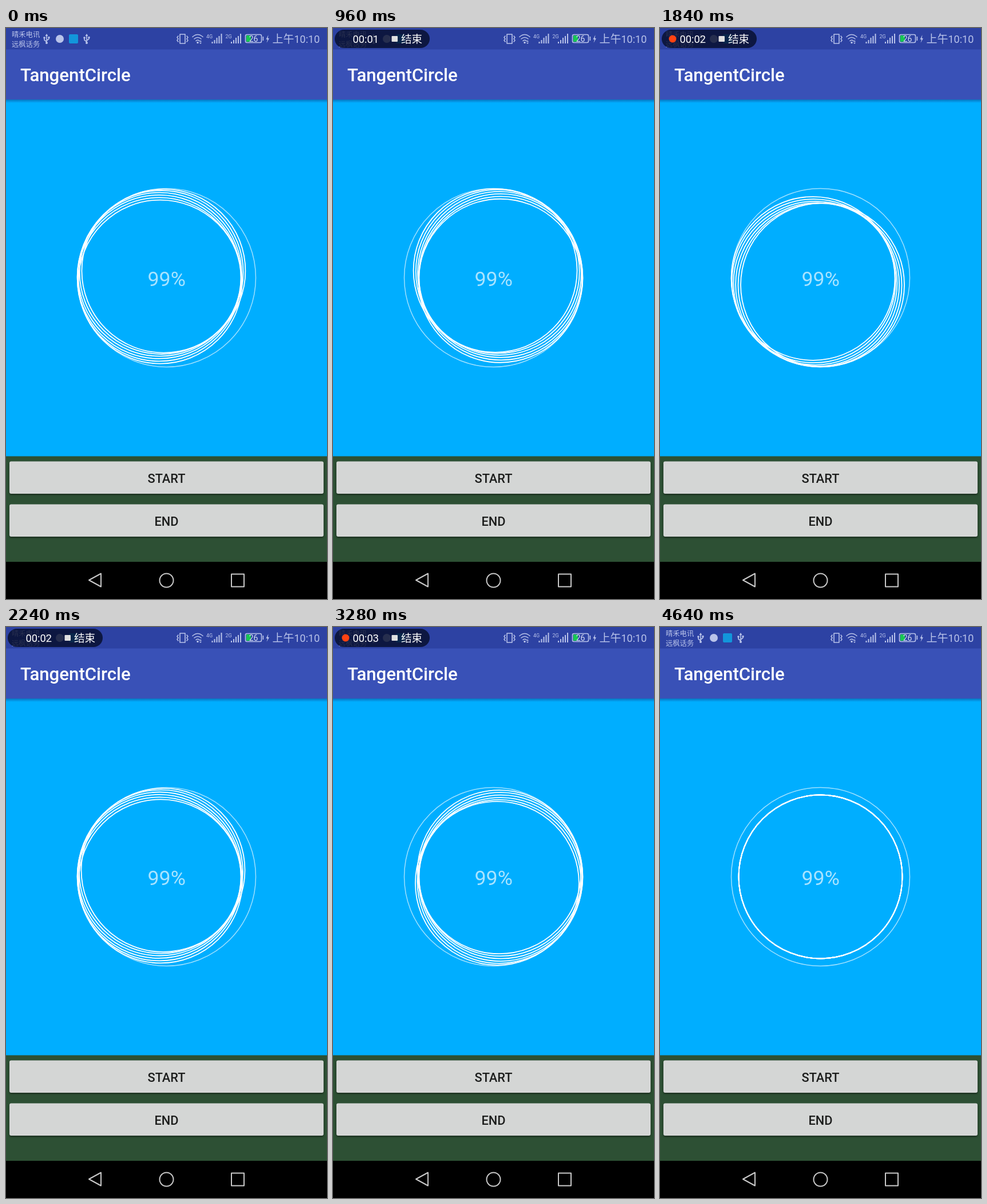
These frames come from a looping animation (561 px wide and 998 px high, 4.8 s). An HTML page:

```html
<!DOCTYPE html>
<html lang="zh">
<head>
<meta charset="utf-8">
<title>TangentCircle</title>
<style>
  html, body { margin: 0; width: 100%; height: 100%; overflow: hidden; background: #000; }
  svg { display: block; width: 100%; height: 100%; }
  text { font-family: Roboto, "Noto Sans CJK SC", "Noto Sans CJK", sans-serif; }
  .cjk { font-family: "Noto Sans CJK SC", "Noto Sans CJK", sans-serif; }
  .line { fill: none; stroke: #b9c3ea; stroke-width: 1.6; stroke-linecap: round; stroke-linejoin: round; }
  .btn text { font-weight: 500; font-size: 21.8px; fill: #1c1d1c; text-anchor: middle; }
  .nav { fill: none; stroke: #c9c9c9; stroke-width: 2; stroke-linejoin: round; }
</style>
</head>
<body>
<svg viewBox="0 0 561 998">
  <defs>
    <linearGradient id="shade" x2="0" y2="1">
      <stop stop-color="#123a80" stop-opacity=".5"/>
      <stop offset="1" stop-color="#123a80" stop-opacity="0"/>
    </linearGradient>
    <filter id="blur" x="-5%" y="-30%" width="110%" height="160%"><feGaussianBlur stdDeviation="1.6"/></filter>
    <g id="usb">
      <path class="line" d="M0-6V7M-4-1V2L0 5M4-2V0L0 3"/>
      <path d="M-2.5-5L0-9L2.5-5ZM2.5-4h3v3h-3Z"/>
      <circle cx="-4" cy="-2" r="1.8"/><circle cy="7" r="2"/>
    </g>
    <path id="bars" d="M0 14h2v3h-2zM4 11h2v6h-2zM8 7h2v10h-2zM12 4h2v13h-2zM16 0h2v17h-2z"/>
  </defs>

  <rect width="561" height="749" fill="#00aeff"/>
  <rect y="125" width="561" height="6" fill="url(#shade)"/>
  <rect width="561" height="125" fill="#3951b7"/>
  <rect width="561" height="37.5" fill="#2d42a3"/>
  <text x="25" y="93" font-size="31.2" font-weight="500" fill="#fff">TangentCircle</text>

  <!-- status bar -->
  <g fill="#b9c3ea">
    <g class="cjk" font-size="12.3">
      <text class="cjk" x="10" y="15.5">晴禾电讯</text>
      <text class="cjk" x="10" y="32.5">远枫话务</text>
    </g>
    <use href="#usb" x="71" y="19"/>
    <circle cx="94" cy="19" r="7"/>
    <rect x="110" y="11" width="16" height="16" rx="2" fill="#1296db"/>
    <use href="#usb" x="141" y="19"/>
    <path class="line" d="M304 11h9v16h-9zM301 14l-2 2.5 2 2.5-2 2.5 2 2.5M316 14l2 2.5-2 2.5 2 2.5-2 2.5"/>
    <path class="line" stroke-width="2" d="M326 15.5q9-8 18 0M329 19q6-5 12 0M332 22.5q3-2.5 6 0"/>
    <circle cx="335" cy="25.5" r="1.7"/>
    <path d="M338 24l2-2.5 2 2.5zM338 25.5h4l-2 2.5z"/>
    <text x="350" y="18" font-size="9">4G</text>
    <use href="#bars" x="359.500" y="10"/>
    <text x="383.500" y="18" font-size="9">2G</text>
    <use href="#bars" x="393" y="10"/>
    <rect class="line" x="418.500" y="11.500" width="28" height="14" rx="2.500"/>
    <rect x="420" y="13" width="8" height="11" fill="#17c653"/>
    <text x="432.500" y="23.800" font-size="14" fill="#d8def5" text-anchor="middle">26</text>
    <path d="M448.500 15h1.700v7h-1.700zM458.500 12l-4 8h2.500l-1.500 6 4.500-8h-2.500z"/>
    <text class="cjk" x="465.500" y="26" font-size="19">上午</text>
    <text x="503.500" y="26" font-size="18">10:10</text>
  </g>

  <!-- recorder badge -->
  <g id="badge" fill="#fff">
    <rect x="3" y="3" width="166" height="32" rx="16" fill="#070e2c" fill-opacity=".82"/>
    <circle id="dot" cx="22" cy="19" r="6.500" fill="#ff4312"/>
    <text id="clock" x="34.500" y="26" font-size="18.300">00:00</text>
    <rect x="102.500" y="14" width="10.500" height="10" rx="1" fill="#e0e0e0"/>
    <text class="cjk" x="119" y="26" font-size="18.500">结束</text>
  </g>

  <g fill="none" stroke="#fff">
    <circle cx="280.500" cy="436.500" r="156" stroke-width="1.500" opacity=".62"/>
    <g id="rings" stroke-width="1.800"></g>
  </g>
  <text x="280.700" y="451" font-size="35.800" fill="#fff" fill-opacity=".66" text-anchor="middle">99%</text>

  <rect y="748.500" width="561" height="185" fill="#2d5034"/>
  <g class="btn">
    <rect x="6" y="760" width="549" height="56" rx="3" fill="#000" opacity=".45" filter="url(#blur)"/>
    <rect x="6" y="757.500" width="549" height="56.500" rx="3" fill="#d4d6d5"/>
    <text x="280.500" y="794.500">START</text>
    <rect id="endShade" x="6" y="835" width="549" height="56" rx="3" fill="#000" opacity=".45" filter="url(#blur)"/>
    <rect id="endFace" x="6" y="832.500" width="549" height="56.500" rx="3" fill="#d4d6d5"/>
    <text x="280.500" y="869.500">END</text>
  </g>

  <rect y="933" width="561" height="65"/>
  <g class="nav">
    <path d="M145 965L166 953.500V976.500Z"/>
    <circle cx="280.500" cy="965.500" r="12"/>
    <rect x="394" y="954.500" width="22" height="22"/>
  </g>
</svg>
<script>
const LOOP = 4800, STEP = 80, COUNT = 6, GAP = 20;
const CX = 280.5, CY = 436.5, RADIUS = 143, OFFSET = 13;
const $ = id => document.getElementById(id);
const clamp = x => Math.min(1, Math.max(0, x));
const smooth = x => x * x * (3 - 2 * x);

const rings = Array.from({ length: COUNT }, () => {
  const ring = document.createElementNS('http://www.w3.org/2000/svg', 'circle');
  ring.setAttribute('r', RADIUS);
  return $('rings').appendChild(ring);
});

// Mean direction of the ring centres, in degrees clockwise from the right
const heading = t => t < 640 ? 197 + 82 * t / 640 : 279 + 0.171 * (t - 640);

function draw(t) {
  const reach = OFFSET * (1 - smooth(clamp((t - 3920) / 400)));
  rings.forEach((ring, i) => {
    const a = (heading(t) + (i - (COUNT - 1) / 2) * GAP) * Math.PI / 180;
    ring.setAttribute('cx', CX + reach * Math.cos(a));
    ring.setAttribute('cy', CY + reach * Math.sin(a));
  });

  $('badge').style.display = t >= STEP && t < 4640 ? '' : 'none';
  $('dot').style.display = (t + 160) % 1600 < 800 ? '' : 'none';
  $('clock').textContent = '00:0' + Math.floor((t + 240) / 1000);

  const press = clamp((t - 3680) / 160) * (1 - clamp((t - 4000) / 320));
  $('endShade').setAttribute('y', 835 + 3 * press);
  $('endFace').style.filter = `brightness(${1 - 0.1 * press})`;
}

const start = performance.now();
function tick() {
  const t = (performance.now() - start) % LOOP;
  draw(Math.floor(t / STEP) * STEP);
  requestAnimationFrame(tick);
}
tick();
</script>
</body>
</html>
```
